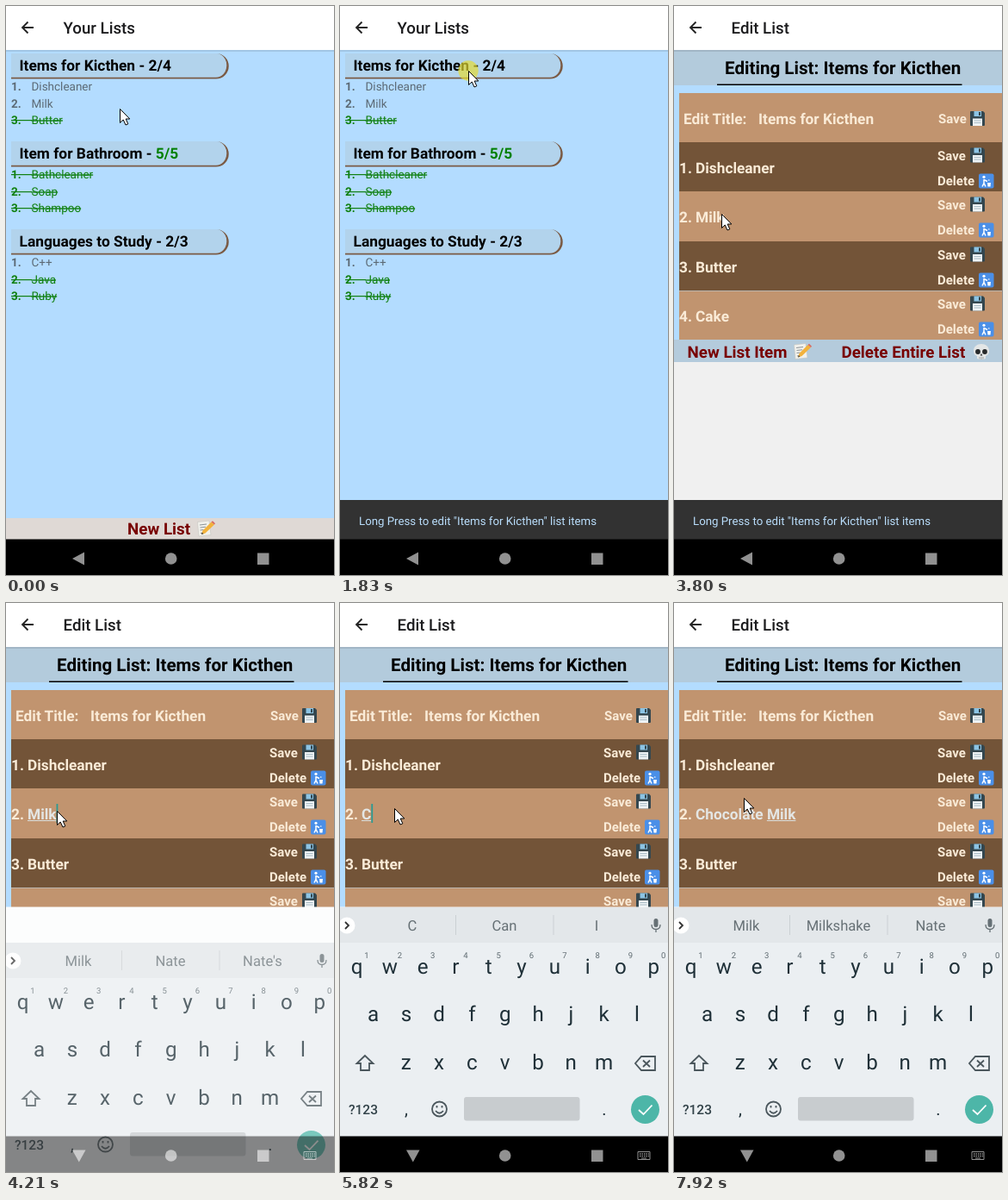
An HTML page that plays this animation: 381 px wide and 660 px high, repeating every 7.99 s.

```html
<!DOCTYPE html>
<html lang="en">
<head>
<meta charset="utf-8">
<title>Shopping lists</title>
<style>
html, body { margin: 0; width: 100%; height: 100%; overflow: hidden; background: #b3dcff; }
svg { display: block; width: 100vw; height: 100vh; font-family: Roboto, sans-serif; }
text { white-space: pre; text-rendering: geometricPrecision; }
.line { fill: none; stroke-width: 1.8; }
</style>
</head>
<body>
<svg id="stage" viewBox="0 0 381 660" preserveAspectRatio="none">
<defs>
  <g id="memo">
    <path d="M1.500 2.500L15 1 17 17.500 3 19Z" fill="#f1f1ec" stroke="#c4c4bf" stroke-width=".6"/>
    <path d="M4 6L12 5M4.500 9L11 8.200M4.500 12L8.500 11.500M5 15.500L7 15.200" stroke="#8d9499" stroke-width="1.100"/>
    <path d="M6 17L7.500 12.500 17.500 2.500 21 5.500 10.500 15.500Z" fill="#f2b23c"/>
    <path d="M17.500 2.500L19 1.200 22 4.200 21 5.500Z" fill="#d9685f"/>
    <path d="M6 17L6.800 14.500 8.500 16.200Z" fill="#444"/>
  </g>
  <g id="floppy">
    <path d="M1 0H15L17 2V16Q17 17 16 17H1Q0 17 0 16V1Q0 0 1 0Z" fill="#34474f"/>
    <path d="M4.500 0H13V6H4.500Z" fill="#8cc4e4"/>
    <path d="M10 1H12V5H10Z" fill="#34474f"/>
    <path d="M3 8.500H14V17H3Z" fill="#eef3f5"/>
    <path d="M4.500 11H12.500M4.500 13.500H12.500" stroke="#a9bcc6"/>
  </g>
  <g id="bin">
    <rect width="17.500" height="17" rx="2" fill="#4a8fe8"/>
    <circle cx="6" cy="3.800" r="1.600" fill="#fff"/>
    <path d="M6 6.500V11L4 15M6 11L8 15M6 7L10 9" fill="none" stroke="#fff" stroke-width="1.500"/>
    <path d="M10 10.500H14L13.500 15H10.500Z" fill="#fff"/>
    <circle cx="11.800" cy="7.500" r=".8" fill="#fff"/>
  </g>
  <g id="skull">
    <path d="M10 1C15 1 19 4 19 9 19 12 18 14 15 15V18Q10 20 5 18V15C2 14 1 12 1 9 1 4 5 1 10 1Z" fill="#e3e6e6"/>
    <ellipse cx="6" cy="10" rx="2.900" ry="3" fill="#26292b"/>
    <ellipse cx="14" cy="10" rx="2.900" ry="3" fill="#26292b"/>
    <path d="M10 12L8.700 14.500H11.300Z" fill="#26292b"/>
    <path d="M8 16V18.500M10 16V19M12 16V18.500" stroke="#8b9092" stroke-width=".8"/>
  </g>
</defs>
</svg>
<script>
const LOOP = 7990, CREAM = '#faebd7', MAROON = '#780000', FOCUS = 4060, SLIDE = 4175;
const stage = document.getElementById('stage');
const $ = id => document.getElementById(id);

const text = (x, y, size, weight, fill, str, extra = '') =>
  `<text x="${x}" y="${y}" font-size="${size}" font-weight="${weight}" fill="${fill}" ${extra}>${str}</text>`;
const rect = (x, y, w, h, fill, extra = '') =>
  `<rect x="${x}" y="${y}" width="${w}" height="${h}" fill="${fill}" ${extra}/>`;
const icon = (name, x, y) => `<use href="#${name}" x="${x}" y="${y}"/>`;
const group = (id, body, extra = '') => `<g id="${id}" ${extra}>${body}</g>`;

const appBar = title =>
  rect(0, 0, 381, 51, '#fff') + rect(0, 51, 381, 2, '#000', 'opacity=".1"') +
  '<path class="line" stroke="#222" d="M32 25H19.500M25.500 18.500L19 25L25.500 31.500"/>' +
  text(66.5, 32, 18.7, 500, '#1c1c1e', title);

// Overview page
function list(top, title, count, items, done) {
  const all = count === '5/5';
  let s = `<g transform="translate(0 ${top})">` +
    '<path d="M6 0H244A14 14 0 0 1 244 28H6Z" fill="#b2d3ec"/>' +
    '<path d="M6 29.500H244A14.700 14.700 0 0 0 244 0A12.300 13.900 0 0 1 244 27.800H6Z" fill="#7b5b45"/>' +
    text(15.5, 20, 17.35, 700, '#000', `${title} - <tspan fill="${all ? '#008000' : '#000'}">${count}</tspan>`);
  items.forEach((item, i) => {
    const y = Math.round(43.3 + 19.4 * i), off = done[i], color = off ? '#108010' : '#5c6a75';
    s += text(6, y, 13.5, 700, color, i + 1 + '.') +
      text(29.5, y, 13.5, 400, color, item, off ? 'text-decoration="line-through"' : '');
    if (off) s += rect(6, y - 5, 24, 1.2, color);
  });
  return s + '</g>';
}
const overview = rect(0, 0, 381, 620, '#b3dcff') + appBar('Your Lists') +
  list(55, 'Items for Kicthen', '2/4', ['Dishcleaner', 'Milk', 'Butter'], [0, 0, 1]) +
  list(157, 'Item for Bathroom', '5/5', ['Bathcleaner', 'Soap', 'Shampoo'], [1, 1, 1]) +
  list(259, 'Languages to Study', '2/3', ['C++', 'Java', 'Ruby'], [0, 1, 1]) +
  rect(0, 594, 381, 25, '#dfd9d5') + text(141, 613, 18.8, 700, MAROON, 'New List') + icon('memo', 221, 596);

// Edit page
const save = (x, y) => text(x, y + 5, 15, 700, CREAM, 'Save') + icon('floppy', 344, y - 9);
let editor = rect(0, 0, 381, 620, '#f0f0f0') + rect(0, 52, 381, 335, '#b3dcff') +
  rect(0, 51, 381, 41, '#b3cbdc') + appBar('Edit List') +
  text(59, 79, 20.6, 700, '#000', 'Editing List: Items for Kicthen') +
  rect(50, 90.5, 284.5, 1.5, '#000') + rect(6, 101, 375, 57, '#c1946f') +
  text(11, 137, 17.3, 700, CREAM, 'Edit Title:') + text(98, 137, 17.3, 700, CREAM, 'Items for Kicthen') + save(307, 131);
['Dishcleaner', 'Milk', 'Butter', 'Cake'].forEach((item, i) => {
  const y = Math.round(158 + 57.3 * i);
  editor += rect(6, y, 375, i % 2 ? 58 : 57, i % 2 ? '#c1946f' : '#735438') +
    text(6, y + 36, 17.3, 700, CREAM, i + 1 + '.') +
    text(25, y + 36, 17.3, 700, CREAM, item, i === 1 ? 'id="field"' : '') +
    save(306, y + 15.5) + text(306, y + 50, 15, 700, CREAM, 'Delete') + icon('bin', 354, y + 36.5);
});
editor += rect(6, 330, 375, 1, '#bcb5ad') + rect(0, 387, 381, 26, '#b4cbdc') +
  text(15.5, 407.5, 18.8, 700, MAROON, 'New List Item') + icon('memo', 138, 390.5) +
  text(194.5, 407.5, 18.8, 700, MAROON, 'Delete Entire List') + icon('skull', 347, 391) +
  rect(25, 252, 0, 1, '#d9dedd', 'id="underline"') + rect(0, 233, 1.8, 22, '#2b9a93', 'id="caret"');

// Keyboard
const INK = '#1f3038', mid = 'text-anchor="middle"';
const letters = rows => rows.map((row, r) => [...row].map((c, i) =>
  text(19.5 + 19.1 * [0, 1, 3][r] + 38.3 * i, [429.5, 485, 540.5][r], 24.2, 400, INK, c, mid)).join('')).join('');
const rows = ['qwertyuiop', 'asdfghjkl', 'zxcvbnm'];
const keyboard = rect(0, 353, 381, 310, '#ebeff2') + rect(0, 353, 381, 41, '#e3e7ea') +
  '<circle cx="8" cy="374" r="9.500" fill="#fff"/><path class="line" stroke="#333" d="M6 370L10 374L6 378"/>' +
  [84, 191, 298].map((x, i) => text(x, 380, 16.6, 400, '#667075', '', `${mid} id="hint${i}"`)).join('') +
  rect(134, 362, 1, 23, '#cbd0d3') + rect(247.5, 362, 1, 23, '#cbd0d3') +
  rect(364.5, 366, 5, 10, '#667075', 'rx="2.500"') +
  '<path class="line" stroke="#667075" style="stroke-width:1.300" d="M362 373Q362 378.500 367 378.500T372 373M367 378.500V382"/>' +
  group('lower', letters(rows)) + group('upper', letters(rows.map(r => r.toUpperCase()))) +
  [...'1234567890'].map((d, i) => text(31 + 38.3 * i, 411.5, 9.5, 400, '#5f6b71', d, mid)).join('') +
  '<path id="shift" class="line" stroke="#4a565c" d="M29 525L19.500 534H24V542H34V534H38.500Z"/>' +
  '<path class="line" stroke="#4a565c" d="M350 526H366V542H350L343 534ZM352 530.500L360 538M360 530.500L352 538"/>' +
  text(10, 592.5, 15.5, 500, '#33434a', '?123') + text(77, 594, 20, 400, INK, ',', mid) +
  '<circle cx="115.500" cy="587" r="8.500" class="line" stroke="#4a565c"/>' +
  '<path class="line" stroke="#4a565c" d="M111 589Q115.500 594.500 120 589M112.500 583V585.500M118.500 583V585.500"/>' +
  rect(144, 573, 134.5, 27.5, '#c8cccf', 'rx="3"') + text(307, 594, 20, 400, INK, '.', mid) +
  '<circle cx="354.500" cy="587.500" r="16.500" fill="#4db6a8"/>' +
  '<path class="line" stroke="#fff" d="M347 588L352.500 593L362.500 582.500"/>';

const nav = rect(0, 618.5, 381, 42, '#000', 'id="bar"') +
  group('buttons', '<path id="back"/><circle cx="191.700" cy="641" r="6.800"/>' +
    '<path d="M292 634.500H305.500V648H292Z"/>' +
    group('switch', '<path d="M346 636.500H360V645.500H346Z" fill="none" stroke="#fff"/>' +
      '<path d="M348 639H359M348 641.500H359" stroke="#fff" stroke-width="1.300" stroke-dasharray="1.500 1"/>' +
      '<path d="M350 644H356" stroke="#fff"/>'), 'fill="#fff" opacity=".57"');

stage.insertAdjacentHTML('beforeend',
  group('overview', overview) + group('editor', editor) +
  group('toast', rect(0, 573, 381, 50, '#323232') +
    text(22, 601.5, 13.25, 400, '#b9ddfb', 'Long Press to edit "Items for Kicthen" list items', 'id="message"')) +
  rect(0, 352.5, 381, 308, '#fcfdfd', 'id="blank"') + group('keyboard', keyboard) + nav +
  group('cursor', '<circle id="press" r="11.700" fill="#e6dc30" opacity=".68"/>' +
    '<path d="M.5 .5V16.500L4.200 13L7 19L9.800 17.800L7.200 12H11.800Z" fill="#fff" stroke="#000"/>'));

// [time, text, suggestions]
const edits = [[0, 'Milk', "Milk,Nate,Nate's"], [4940, 'Mil', 'Mil,Mile,Miles'], [5080, 'Mi', 'Mi,Mine,Might'],
  [5290, 'M', 'M,My,May'], [5490, '', "I,The,I'm"]];
const hints = ['C,Can,I', 'Ch,Check,Change', 'Cho,Choose,Chose', 'Choc,Chocolate,Chocolates',
  'Choco,Chocolate,Chocolates', 'Chocol,Chocolate,Chocolates', 'Chocola,Chocolate,Chocolates',
  'Chocolat,Chocolate,Chocolates', 'Chocolate,Chocolates,Chocolatey', 'chip,cake,and',
  'M,Milk,My', 'Mi,Milk,Mint', 'Mil,Milk,Mill', 'Milk,Milkshake,Nate'];
[5820, 5890, 6160, 6230, 6300, 6500, 6600, 6700, 6800, 6900, 7000, 7100, 7240, 7300]
  .forEach((t, i) => edits.push([t, 'Chocolate Milk'.slice(0, i + 1), hints[i]]));

// [time, x, y]
const path = [[0, 132, 119], [70, 132, 119], [120, 132, 117], [260, 132, 117], [480, 147, 70], [650, 147, 70],
  [1020, 149, 87], [1560, 149, 87], [1760, 149, 75], [2960, 149, 75], [3520, 55, 241], [3800, 55, 241],
  [3870, 59, 241], [4940, 59, 241], [5150, 63, 238], [7800, 63, 238], [7920, 81, 226], [LOOP, 81, 226]];
const presses = [[440, 650], [1770, 2970], [3870, 3990]];

const part = (t, a, b) => Math.min(1, Math.max(0, (t - a) / (b - a)));
const show = (id, on) => $(id).style.display = on ? '' : 'none';
const set = (id, name, value) => $(id).setAttribute(name, value);

function draw(t) {
  const i = path.findIndex(p => p[0] > t), [t0, x0, y0] = path[i - 1], [t1, x1, y1] = path[i];
  const k = part(t, t0, t1), e = k * k * (3 - 2 * k);
  set('cursor', 'transform', `translate(${x0 + (x1 - x0) * e} ${y0 + (y1 - y0) * e})`);
  show('press', presses.some(([a, b]) => t >= a && t < b));

  const rise = (1 - part(t, 720, 1160)) ** 3;
  show('toast', t >= 720);
  set('toast', 'transform', `translate(0 ${46 * rise})`);
  set('message', 'opacity', part(t, 820, 1090));

  const zoom = 1 + .157 * (1 - (1 - part(t, 2750, 2890)) ** 2), fade = part(t, 2770, 2970);
  show('overview', fade < 1);
  set('overview', 'transform', `translate(190.5 305) scale(${zoom}) translate(-190.5 -305)`);
  show('editor', fade > 0);
  set('editor', 'opacity', fade);

  const [time, value, words] = edits.findLast(s => s[0] <= t);
  const focus = t >= FOCUS, field = $('field'), cut = value.lastIndexOf(' ') + 1;
  field.textContent = value.slice(0, cut);
  const start = cut ? field.getComputedTextLength() : 0;
  field.textContent = value;
  const end = value ? field.getComputedTextLength() : 0;
  set('field', 'fill', focus ? '#e4e6e4' : CREAM);
  set('underline', 'x', 25 + start);
  set('underline', 'width', focus ? end - start : 0);
  show('caret', focus && (t - Math.max(time, FOCUS)) % 1100 < 550);
  set('caret', 'x', 25 + end);

  const p = part(t, SLIDE, SLIDE + 170), open = t >= 4110;
  show('blank', open);
  show('keyboard', p > 0);
  set('keyboard', 'transform', `translate(0 ${66 * (1 - p) ** 2})`);
  set('keyboard', 'opacity', Math.min(1, 3.5 * p));
  words.split(',').forEach((w, n) => $('hint' + n).textContent = w);
  show('lower', value);
  show('upper', !value);
  set('shift', 'style', value ? '' : 'fill:#4a565c');

  set('bar', 'opacity', open && p < 1 ? .45 : 1);
  set('back', 'd', open ? 'M77 634.500H92.500L84.800 648.500Z' : 'M77 641L91 633.500V648.500Z');
  show('switch', open);
}

function tick() {
  draw(performance.now() % LOOP);
  requestAnimationFrame(tick);
}
tick();
</script>
</body>
</html>
```
